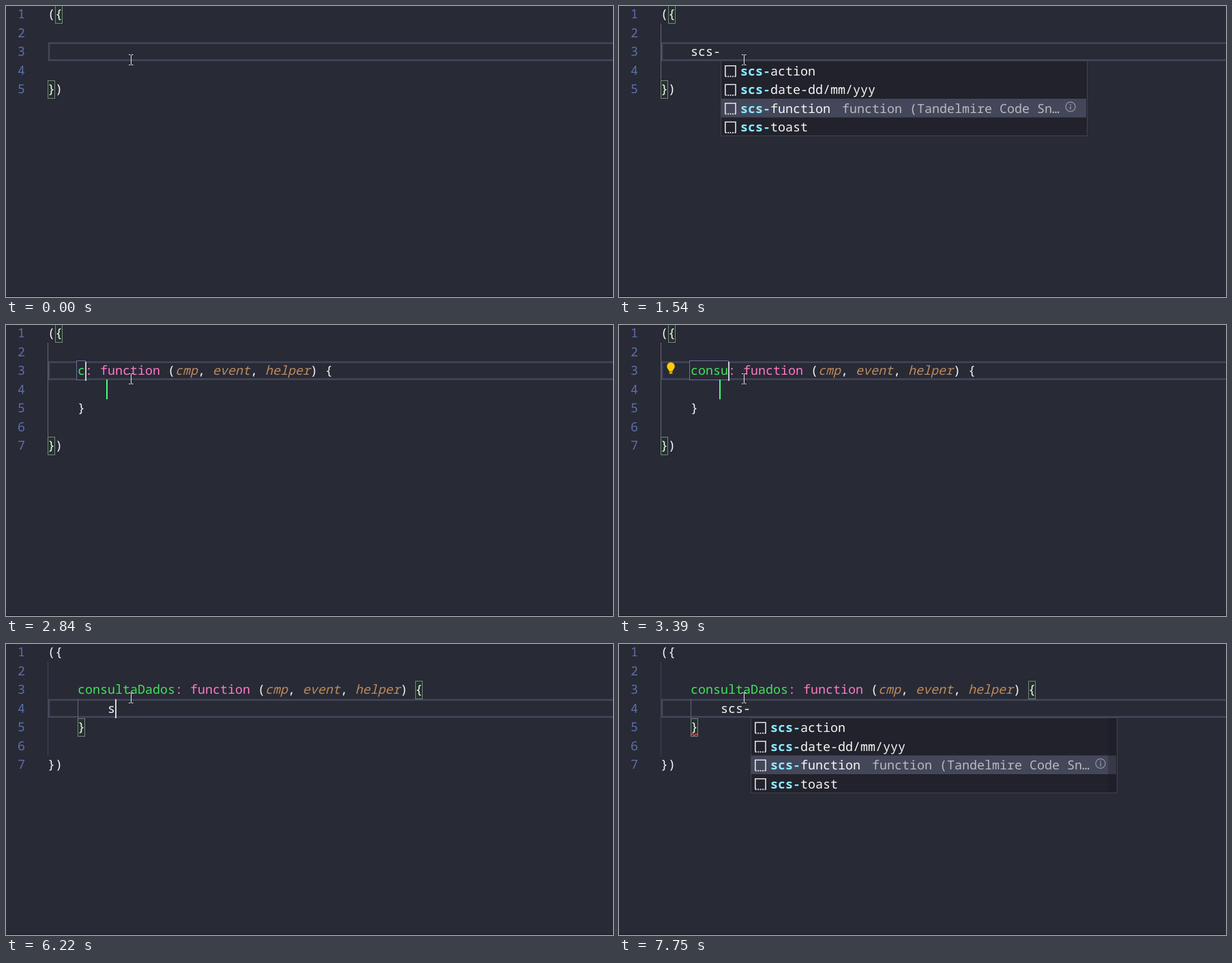
An HTML page that plays this animation: 890x427 px, repeating every 8 s.

```html
<!DOCTYPE html>
<html lang="en">
<head>
<meta charset="utf-8">
<title>Code snippets in an editor</title>
<style>
html, body { margin: 0; width: 100%; height: 100%; overflow: hidden; background: #282a36; }
svg { display: block; }
text {
  font-family: "Noto Sans Mono", "DejaVu Sans Mono", monospace;
  font-size: 18.3333px; font-weight: 500; fill: #f8f8f2;
  white-space: pre; text-rendering: geometricPrecision;
}
.num { fill: #5c70a8; font-weight: 400; }
.name { fill: #50fa7b; }
.typed { fill: #41e35c; }
.pink { fill: #ff79c6; }
.arg { fill: #ffb86c; font-style: italic; }
.dim { fill: #bf8a5a; }
.hit { fill: #8be9fd; font-weight: 700; }
.note { fill: #b9babf; font-weight: 400; }
</style>
</head>
<body>
<svg id="stage" width="890" height="427" viewBox="0 0 890 427"></svg>
<script>
(() => {
const LOOP = 8000, CW = 11, LH = 27.5, X0 = 61;
const stage = document.getElementById('stage');

const SNIPPETS = ['scs-action', 'scs-date-dd/mm/yyy', 'scs-function', 'scs-toast'];
const KEY_WORDS = [...SNIPPETS, 'set', 'static', 'super', 'switch'];
const BODY_WORDS = [...SNIPPETS, 'scrollbars', 'speechSynthesis', 'ServiceWorkerRegistration',
  'SourceBufferList', 'SpeechSynthesis', 'SpeechSynthesisEvent', 'SpeechSynthesisVoice',
  'SpeechSynthesisUtterance'];

// Timelines: [start, value]
const KEY_TYPED = [[240, 's'], [420, 'sc'], [510, 'scs'], [920, 'scs-']];
const KEY_QUERY = [[330, 's'], [420, 'sc'], [600, 'scs'], [920, 'scs-']];
const KEY_ROW = [[1230, 1], [1390, 2]];
const NAME = [[1760, 'functionName'], [2840, 'c'], [2950, 'co'], [3060, 'con'], [3170, 'cons'],
  [3280, 'consu'], [3620, 'consul'], [3850, 'consult'], [4080, 'consulta'], [4210, 'consultaD'],
  [4340, 'consultaDa'], [4470, 'consultaDad'], [4600, 'consultaDado'], [4730, 'consultaDados']];
const BODY_TYPED = [[6220, 's'], [6500, 'sc'], [6660, 'scs'], [7120, 'scs-']];
const BODY_QUERY = [[6350, 's'], [6500, 'sc'], [6660, 'scs'], [7120, 'scs-']];
const BODY_ROW = [[7590, 1], [7750, 2]];
const CARET_OFF = [[0, 240], [1450, 1760], [2380, 2840], [5570, 6120], [7750, LOOP]];

const pick = (rows, t, start) => rows.reduce((v, [s, x]) => t >= s ? x : v, start);
const within = (t, a, b) => t >= a && t < b;
const colX = c => X0 + c * CW;
const lineY = line => LH * (line - 1) - 1.5;

const rect = (x, y, w, h, fill, extra = '') =>
  `<rect x="${x}" y="${y}" width="${w}" height="${h}" fill="${fill}" ${extra}/>`;
const path = (d, stroke, w = 1, fill = 'none') =>
  `<path d="${d}" fill="${fill}" stroke="${stroke}" stroke-width="${w}"/>`;
const text = (x, y, body, cls = '') => `<text x="${x}" y="${y}" class="${cls}">${body}</text>`;
const span = (cls, s) => `<tspan class="${cls}">${s}</tspan>`;
const code = (c, line, body, cls) => text(colX(c), lineY(line) + 19.7, body, cls);

const lineBox = line =>
  rect(63, lineY(line) + 1, 840, LH - 2.5, 'none', 'stroke="#44475a" stroke-width="2.5"');
const guide = (c, from, to, on) =>
  rect(colX(c), Math.round(lineY(from)), 1, LH * (to - from + 1), on ? '#666976' : '#43465a');
const bracket = (c, line) => rect(colX(c) + 0.5, Math.round(lineY(line)) + 0.5, 10, 26,
  'rgba(0,100,0,.12)', 'stroke="#78877c"');
const caret = (c, line, fill = '#d6d6d8') =>
  rect(colX(c), Math.round(lineY(line)), 2, 28, fill);

function squiggle(c, line, n) {
  const y = lineY(line) + 26;
  let d = `M${colX(c)} ${y}`;
  for (let i = 1; i <= n * 4; i++) d += `L${colX(c) + i * CW / 4} ${y - (i % 2) * 2.6}`;
  return path(d, '#f04a50', 1.3);
}

// Marks the letters of query in word, or returns '' when they do not all occur in order
function matched(word, query) {
  let i = 0, out = '';
  for (const ch of word) {
    const hit = i < query.length && ch.toLowerCase() === query[i];
    if (hit) i++;
    out += hit ? span('hit', ch) : ch;
  }
  return i === query.length ? out : '';
}

function popup(c, line, words, query, row) {
  const x = colX(c), y = lineY(line) + LH;
  const rows = words.map(w => [w, matched(w, query)]).filter(r => r[1]);
  let out = rect(x + 0.5, Math.round(y) - 0.5, 537, rows.length * LH, '#21222c', 'stroke="#434348"');
  rows.forEach(([word, body], i) => {
    const ry = y + i * LH, base = ry + 20.7;
    if (i === row) out += rect(x + 1, ry, 535, LH, '#44475a');
    const ix = x + 6.8, iy = ry + 6.8;
    out += path(`M${ix} ${iy + 15.5}V${iy}H${ix + 15.2}V${iy + 15.5}`, '#e4e4e4', 1.6);
    out += `<path d="M${ix} ${iy + 15.5}h16" stroke="#e4e4e4" stroke-width="1.8" stroke-dasharray="2 1.4"/>`;
    out += text(x + 29, base, body);
    if (i !== row || !word.startsWith('scs-')) return;
    const nx = 29 + word.length * CW + 17;
    const room = Math.floor((497 - nx) / CW);
    const note = `${word.slice(4)} (Tandelmire Code Snippets)`;
    out += text(x + nx, base, note.slice(0, room - 1) + '…', 'note');
    const cx = x + 513, cy = ry + 11.8;
    out += `<circle cx="${cx}" cy="${cy}" r="7" fill="none" stroke="#92939f" stroke-width="1.3"/>`;
    out += path(`M${cx} ${cy - 4}v2M${cx} ${cy - 0.8}v5`, '#92939f', 1.5);
  });
  if (line === 4) out += rect(x + 524, y, 12, rows.length * LH - 1, 'rgba(24,25,34,.3)');
  return out;
}

const bulb = () =>
  path('M73.5 68C73.5 66 70.3 64.5 70.3 60.5A5.7 5.7 0 0 1 81.7 60.5C81.7 64.5 78.5 66 78.5 68Z',
    'none', 0, '#ffcc00') + rect(73.8, 68.5, 4.5, 3, '#d9b425');

const mouse = () =>
  path('M180 71.5h2.5M184 71.5h2.5M180 86.5h2.5M184 86.5h2.5M183.5 72v14', '#e8e8e8');

function keyScene(t, showCaret) {
  const typed = pick(KEY_TYPED, t, ''), query = pick(KEY_QUERY, t, '');
  const end = 4 + typed.length;
  let out = lineBox(3);
  if (typed) out += guide(0, 2, 4, true);
  out += bracket(1, 1) + bracket(0, 5) + code(4, 3, typed);
  if (t >= 1550) out += squiggle(0, 5, 2);
  if (showCaret) out += caret(end, 3);
  if (query) out += popup(end, 3, KEY_WORDS, query, pick(KEY_ROW, t, 0));
  return out;
}

function nameScene(t, showCaret) {
  const name = pick(NAME, t, ''), end = 4 + name.length;
  const editing = t < 5100, typing = t >= 2840;
  const arg = s => span(t >= 2240 ? 'arg dim' : 'arg', s);
  let out = '';
  if (!editing) out += lineBox(4);
  else if (typing) out += lineBox(3);
  out += guide(0, 2, 6, editing && typing);
  if (editing) {
    out += bracket(1, 1) + bracket(0, 7);
    out += rect(103.5, 52.5, name.length * CW + 2, 28, '#282a36', 'stroke="#66709a"');
  } else {
    out += guide(4, 4, 4, true);
    if (t >= 5190) out += bracket(end + 32, 3) + bracket(4, 5);
  }
  out += code(4, 3, span(typing ? 'typed' : 'name', name) + span('pink', ': function') + ' (' +
    arg('cmp') + ', ' + arg('event') + ', ' + arg('helper') + ') {');
  out += code(4, 5, '}');
  if (t < 1920) out += squiggle(7, 3, 1) + squiggle(0, 7, 2);
  if (within(t, 3390, 4080)) out += bulb();

  if (editing) {
    out += rect(147, 80, 2, 29, '#50fa7b');
    if (showCaret) out += caret(end, 3, typing ? '#c9c9cc' : '#f0c4dc');
    return out;
  }
  const typed = pick(BODY_TYPED, t, ''), query = pick(BODY_QUERY, t, '');
  out += code(8, 4, typed);
  if (t >= 7590) out += squiggle(4, 5, 1);
  if (showCaret) out += caret(8 + typed.length, 4);
  if (query) out += popup(8 + typed.length, 4, BODY_WORDS, query, pick(BODY_ROW, t, 0));
  return out;
}

function scene(t) {
  const showCaret = !CARET_OFF.some(([a, b]) => within(t, a, b));
  const expanded = t >= 1760, lines = expanded ? 7 : 5;
  let out = rect(0, 0, 890, 427, '#282a36');
  for (let n = 1; n <= lines; n++) out += code(-4, n, n, 'num');
  out += (expanded ? nameScene : keyScene)(t, showCaret);
  out += code(0, 1, '({') + code(0, lines, '})');
  return out + mouse() + rect(0, 426, 890, 1, '#1b1a23');
}

let shown = '';
function draw(t) {
  const next = scene(t % LOOP);
  if (next !== shown) stage.innerHTML = shown = next;
}

const began = performance.now();
function tick() {
  draw(performance.now() - began);
  requestAnimationFrame(tick);
}
tick();
})();
</script>
</body>
</html>
```
